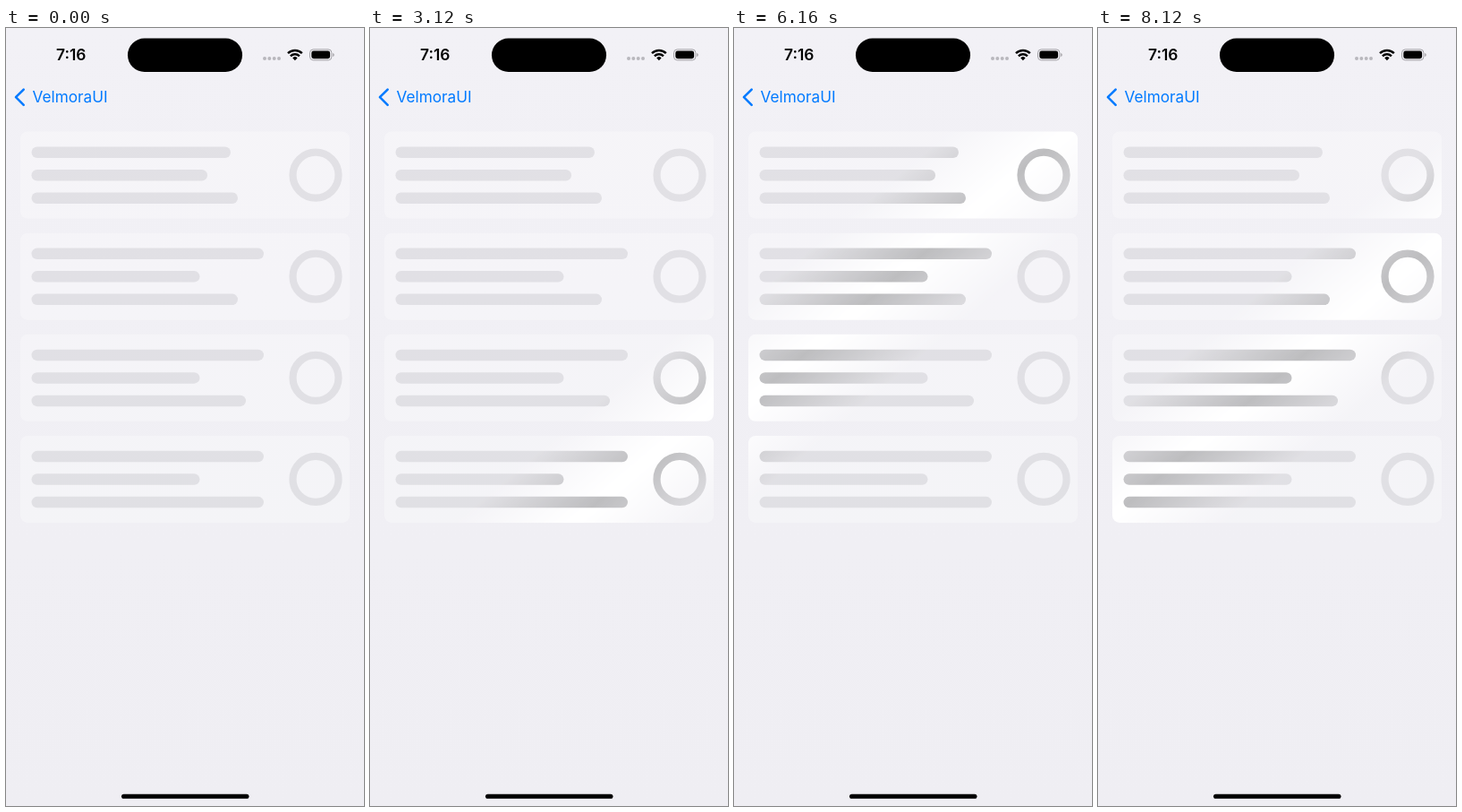
Write an HTML page that moves like this. It is 400x868 px and loops after 8160 ms.

```html
<!DOCTYPE html>
<html lang="en">
<head>
<meta charset="utf-8">
<title>Loading cards</title>
<style>
  html, body { margin: 0; width: 100%; height: 100%; overflow: hidden; background: #f0eff4; }
  svg { display: block; width: 400px; height: 868px; }
  text { font-family: Inter, Roboto, sans-serif; }
</style>
</head>
<body>
<svg viewBox="0 0 400 868">
  <defs>
    <linearGradient id="page" x2="0" y2="1">
      <stop stop-color="#f2f1f6"/>
      <stop offset="1" stop-color="#efeef3"/>
    </linearGradient>
    <linearGradient id="band" gradientUnits="userSpaceOnUse">
      <stop stop-color="#fff" stop-opacity=".3"/>
      <stop offset=".5" stop-color="#fff"/>
      <stop offset="1" stop-color="#fff" stop-opacity=".3"/>
    </linearGradient>
    <mask id="shimmer" maskUnits="userSpaceOnUse" x="0" y="100" width="400" height="470">
      <rect y="100" width="400" height="470" fill="url(#band)"/>
    </mask>
  </defs>

  <rect width="400" height="868" fill="url(#page)"/>

  <!-- status bar -->
  <text x="72.7" y="36" font-size="17.4" font-weight="600" text-anchor="middle">7:16</text>
  <rect x="136" y="11.5" width="128" height="37.5" rx="18.75"/>
  <g fill="#b9b8bd">
    <circle cx="289" cy="34" r="2"/>
    <circle cx="294.3" cy="34" r="2"/>
    <circle cx="299.7" cy="34" r="2"/>
    <circle cx="305" cy="34" r="2"/>
  </g>
  <g fill="none" stroke="#000" stroke-width="2.5">
    <path d="M315 28.2a11.4 11.4 0 0 1 15.8 0"/>
    <path d="M317.9 31.3a7.2 7.2 0 0 1 10 0"/>
  </g>
  <path d="M322.9 36.2l-2.7-2.8a3.9 3.9 0 0 1 5.4 0z"/>
  <rect x="339.5" y="23.9" width="24.4" height="12" rx="3.8" fill="none" stroke="#a3a2a7"/>
  <rect x="341.3" y="25.6" width="20.8" height="8.6" rx="2.4"/>
  <path d="M365.2 27.9a2.2 2.2 0 0 1 0 4.2z" fill="#a3a2a7"/>

  <!-- navigation bar -->
  <path d="M19.7 68.6L11 77.2l8.7 8.6" fill="none" stroke="#007aff" stroke-width="2.6"
        stroke-linecap="round" stroke-linejoin="round"/>
  <text x="29.5" y="83.3" font-size="17.2" fill="#007aff">VelmoraUI</text>

  <g id="cards" mask="url(#shimmer)"></g>

  <rect x="129" y="854.7" width="142.5" height="5.1" rx="2.55"/>
</svg>
<script>
const LOOP = 8160, FIRST = 236, PERIOD = 1762, SWEEP = 1500;
const LEFT = 16, TOP = 115.6, WIDTH = 368, HEIGHT = 436.3, PITCH = 113.1, BAND = 0.3;
const barEnds = [[251, 225, 259], [288, 216.5, 259], [288, 216.5, 268], [288, 216.5, 288]];

const bar = (end, i) =>
  `<rect x="28.5" y="${16.9 + i * 25.5}" width="${end - 28.5}" height="12.5" rx="6.25" fill="#bdbdbf"/>`;

document.getElementById('cards').innerHTML = barEnds.map((ends, i) => `
  <g transform="translate(0 ${TOP + i * PITCH})">
    <rect x="${LEFT}" width="${WIDTH}" height="97" rx="8" fill="#fff"/>
    ${ends.map(bar).join('')}
    <circle cx="346" cy="48.5" r="25.5" fill="none" stroke="#bdbdbf" stroke-width="8.2"/>
  </g>`).join('');

const band = document.getElementById('band');
const set = (name, value) => band.setAttribute(name, value);
set('x1', LEFT);
set('y1', TOP);
set('x2', LEFT + BAND * WIDTH);
set('y2', TOP + BAND * HEIGHT);

function draw() {
  const t = performance.now() % LOOP;
  // The band crosses the stack along its diagonal, then rests outside it.
  const p = t < FIRST ? 1 : Math.min(1, (t - FIRST) % PERIOD / SWEEP);
  const shift = (1 + BAND) * p - BAND;
  set('gradientTransform', `translate(${shift * WIDTH} ${shift * HEIGHT})`);
  requestAnimationFrame(draw);
}
draw();
</script>
</body>
</html>
```
